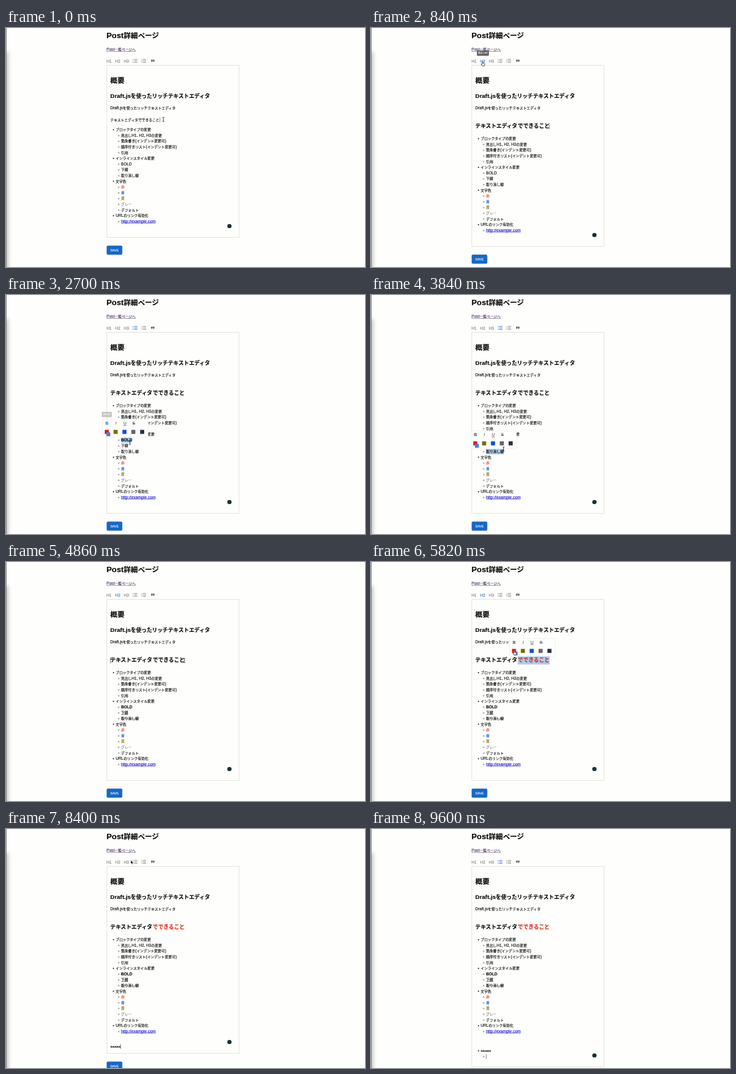
Animation, 600 px wide and 400 px high, one loop 9720 ms. Source, as an HTML page:

```html
<!DOCTYPE html>
<html lang="ja">
<head>
<meta charset="utf-8">
<title>Post詳細ページ</title>
<style>
  html, body { margin: 0; width: 100%; height: 100%; overflow: hidden; background: #fefefc; }
  svg { display: block; width: 600px; height: 400px; }
  text {
    font-family: "Noto Sans CJK JP", "Noto Sans CJK", sans-serif; white-space: pre;
    color: #0c0c0c; fill: currentColor; stroke: currentColor; stroke-width: .14px;
  }
  .latin { font-family: "Liberation Sans", Arial, sans-serif; font-size: 1.12em; }
</style>
</head>
<body>
<svg viewBox="0 0 600 400">
  <defs>
    <filter id="blur" x="-200%" y="-20%" width="500%" height="140%"><feGaussianBlur stdDeviation="3.5"/></filter>
  </defs>
  <rect x="-12" y="40" width="15" height="420" fill="#a0a0a4" opacity=".75" filter="url(#blur)"/>
  <rect width="1" height="400" fill="#808080"/>
  <g id="page"></g>
</svg>
<script>
const LOOP = 9720;
const INK = '#0c0c0c', GREY = '#808080', BLUE = '#2a72e0', PAPER = '#fefefc', VISITED = '#45305c', LINK = '#1208d8';
const BASE = 5.92, LEFT = 174.3, PITCH = 9.6;
const COLORS = { red: '#ee3a24', blue: '#1660d0', yellow: '#94740c', grey: '#808080' };

// Moments at which the document changes
const AT = { heading: 780, bold: 2460, underline: 3360, strike: 4080, headingClick: 4500, red: 5760,
             bottomClick: 6720, newline: 7260, typing: 7440, list: 8640, enter: 9060, indent: 9360 };

// [time, x, y] of the mouse
const MOUSE = [
  [0, 263, 153], [120, 263, 153], [600, 186.5, 57], [960, 186.5, 57],
  [1500, 193, 243], [1620, 193, 243], [1860, 208, 245], [2040, 208, 245],
  [2340, 168, 216], [2490, 168, 216], [2680, 207, 247], [2760, 207, 247], [2880, 193, 252],
  [2940, 193, 252], [3060, 205, 252], [3270, 195.5, 225], [3420, 195.5, 225],
  [3540, 193, 262], [3600, 193, 262], [3780, 222, 262], [4020, 219.5, 235],
  [4140, 219.5, 235], [4440, 176, 165], [4560, 176, 165], [4860, 298, 165],
  [4980, 298, 165], [5280, 246, 165], [5340, 246, 165], [5670, 239.5, 149],
  [5880, 239.5, 149], [6600, 264, 341], [8040, 264, 341], [8400, 208.5, 52],
  [8520, 215.5, 56], [9000, 215.5, 56]
];

const SELECTIONS = [
  { begin: 1620, end: 1860, close: 2850, from: 192.3, to: 210.3, y: 242.6, h: 9.6, done: AT.bold, tool: 0 },
  { begin: 2940, end: 3060, close: 3510, from: 192.3, to: 204.3, y: 252.2, h: 9.6, done: AT.underline, tool: 2 },
  { begin: 3600, end: 3780, close: 4320, from: 192.3, to: 222, y: 261.8, h: 9.6, done: AT.strike, tool: 3 },
  { begin: 4980, end: 5280, close: 6060, from: 298.5, to: 245.3, y: 164.5, h: 14, done: Infinity, tool: -1 }
];

// [start, end, centre x, centre y, width, text]
const TOOLTIPS = [
  [560, 1140, 187, 42, 20, '見出しH2'], [2310, 2770, 168.5, 200, 17, 'BOLD'],
  [3240, 3540, 195.5, 209.7, 27, 'UNDERLINE'], [3990, 4260, 219.5, 219.3, 20, '取り消し線'],
  [8500, 9360, 215.5, 42, 19, '箇条書き']
];

const clamp = (v, a = 0, b = 1) => Math.min(b, Math.max(a, v));
const ease = p => p * p * (3 - 2 * p);
const rect = (x, y, w, h, fill, extra = '') =>
  `<rect x="${x}" y="${y}" width="${w}" height="${h}" fill="${fill}" ${extra}/>`;
const path = (d, extra) => `<path d="${d}" ${extra}/>`;
const line = (x1, x2, y, color, w = .6) => path(`M${x1} ${y}H${x2}`, `stroke="${color}" stroke-width="${w}"`);
const colored = color => `style="color:${color}"`;

// Text placed by its vertical centre; ASCII runs use the Latin face
function text(x, cy, string, size = BASE, extra = '') {
  const runs = string.replace(/[ -~]+/g, run => `<tspan class="latin">${run}</tspan>`);
  return `<text x="${x}" y="${cy + size * .36}" font-size="${size}" ${extra}>${runs}</text>`;
}

function bullet(level, y) {
  return level
    ? `<circle cx="188.4" cy="${y + .4}" r=".95" fill="none" stroke="#444" stroke-width=".5"/>`
    : `<circle cx="179.6" cy="${y + .2}" r="1" fill="${INK}"/>`;
}

function listIcon(x, numbered, color) {
  return [52.6, 55.1, 57.6].map((y, i) =>
    rect(x, y - .5, numbered && i === 1 ? 1.5 : 1.1, 1, color) + rect(x + 2.3, y - .45, 5.4, .9, color)).join('');
}

function toolbar(t) {
  const onList = (t >= 1620 && t < AT.headingClick) || t >= AT.list;
  const onHeading = (t >= AT.heading && t < 1620) || (t >= AT.headingClick && t < AT.bottomClick);
  const quote = x => path(`M${x} 53h2.4v2.2l-1.1 1.9h-1.1l.8-1.7h-1z`, 'fill="#555"');
  return ['H1', 'H2', 'H3'].map((name, i) =>
      text(168 + 14.5 * i, 55.4, name, BASE, colored(i === 1 && onHeading ? BLUE : GREY))).join('')
    + listIcon(211.8, false, onList ? BLUE : GREY) + listIcon(226.4, true, GREY)
    + quote(242.6) + quote(245.7);
}

function listRows(t, top) {
  const rows = [
    [0, 'ブロックタイプの変更'], [1, '見出しH1, H2, H3の変更'], [1, '箇条書き(インデント変更可)'],
    [1, '順序付きリスト(インデント変更可)'], [1, '引用'], [0, 'インラインスタイル変更'],
    [1, 'BOLD', t >= AT.bold ? 'font-weight="700"' : ''], [1, '下線'], [1, '取り消し線'], [0, '文字色'],
    [1, '赤', colored(COLORS.red)], [1, '青', colored(COLORS.blue)],
    [1, '黄', colored(COLORS.yellow)], [1, 'グレー', colored(COLORS.grey)],
    [1, 'デフォルト'], [0, 'URLのリンク有効化']
  ];
  const rowY = i => top + PITCH * i;
  let out = rows.map(([level, string, extra], i) =>
    bullet(level, rowY(i)) + text(level ? 192.3 : 183.3, rowY(i), string, BASE, extra)).join('');
  if (t >= AT.underline) out += line(192.3, 204.2, rowY(7) + 3.2, INK, .5);
  if (t >= AT.strike) out += line(192.3, 222, rowY(8) + .3, INK, .4);
  const linkY = rowY(16);
  return out + bullet(1, linkY) + text(192.3, linkY, 'http://example.com', 6.13, colored(LINK))
    + line(192.3, 250, linkY + 3.1, LINK);
}

function tail(t, typed) {
  if (t < AT.typing) return '';
  const word = 'a'.repeat(typed);
  if (t < AT.list) return text(LEFT, 364, word, 5.5);
  let out = bullet(0, 371) + text(183.3, 371, word, 5.5);
  if (t >= AT.enter) out += bullet(t >= AT.indent ? 1 : 0, 380.5);
  return out;
}

function caret(t, typed) {
  if (SELECTIONS.some(s => t >= s.begin && t < s.close)) return '';
  let x, y, h = 8;
  if (t < AT.heading) [x, y] = [256.8, 153.5];
  else if (t < 1620) [x, y, h] = [297.6, 164.5, 10.5];
  else if (t < AT.headingClick) return '';
  else if (t < 4980) [x, y, h] = [174.3, 164.5, 10.5];
  else if (t < AT.bottomClick) return '';
  else if (t < AT.newline) [x, y] = [174.5, 354];
  else if (t < AT.list) [x, y] = [174.3 + typed * 3.43, 364];
  else if (t < AT.enter) [x, y] = [183.3 + typed * 3.43, 371];
  else [x, y] = [t < AT.indent ? 183.3 : 192.3, 380.5];
  return rect(x, y - h / 2, .6, h, '#333');
}

function highlight(s, t) {
  const edge = s.from + (s.to - s.from) * clamp((t - s.begin) / (s.end - s.begin));
  return rect(Math.min(s.from, edge), s.y - s.h / 2, Math.abs(edge - s.from), s.h, '#a6cdf2');
}

const popupBox = s => ({ x: (s.from + s.to) / 2 - 40, y: s.y - s.h / 2 - 29.7 });

function popup(s, t) {
  const { x, y } = popupBox(s);
  const styles = ['font-weight="700"', 'font-style="italic"', 'text-decoration="underline"', 'text-decoration="line-through"'];
  return rect(x, y, 76, 30, PAPER, 'rx="1.5" stroke="#ececea" stroke-width=".8"')
    + styles.map((style, i) => text(x + 7.3 + 15 * i, y + 7, 'BIUS'[i], 6,
        `${style} text-anchor="middle" ${colored(i === s.tool && t >= s.done ? BLUE : '#555')}`)).join('')
    + ['#e01c10', '#7c6a00', '#0c50d0', '#666', '#26324a'].map((color, i) =>
        rect(x + 3.7 + 14.8 * i, y + 17.6, 6.8, 6.8, color)).join('')
    + rect(x + 6.5, y + 21.8, 6.5, 6.5, '#3f7fe8');
}

function tooltip([start, end, x, y, width, string], t) {
  const opacity = clamp((t - start) / 120) * clamp((end - t) / 200);
  if (!opacity) return '';
  return `<g opacity="${opacity}">${rect(x - width / 2, y - 4.5, width, 9, '#616161', 'rx="1"')}`
    + text(x, y, string, 3.6, `text-anchor="middle" ${colored('#fff')}`) + '</g>';
}

function mouseAt(t) {
  const next = MOUSE.findIndex(point => point[0] > t);
  if (next < 0) return MOUSE[MOUSE.length - 1].slice(1);
  const [t0, x0, y0] = MOUSE[next - 1], [t1, x1, y1] = MOUSE[next];
  const p = ease((t - t0) / (t1 - t0));
  return [x0 + (x1 - x0) * p, y0 + (y1 - y0) * p];
}

function cursor(t, openPopup) {
  if ((t >= 7200 && t < 8040) || t >= 9000) return '';
  const [x, y] = mouseAt(t);
  const box = openPopup && popupBox(openPopup);
  const inPopup = box && x > box.x && x < box.x + 76 && y > box.y && y < box.y + 30;
  const onTool = y > 50 && y < 61 && [172, 186.5, 201, 215.5, 230, 245.5].some(cx => Math.abs(x - cx) < 5);
  let shape;
  if (inPopup || onTool) {
    shape = path('M-.7-.5Q0-1.3 .7-.5V2L3 2.6Q3.8 3 3.6 4L3 6.6H-.5L-2.5 3.7Q-2.5 2.6-.7 3.7Z',
      'fill="#fff" stroke="#222" stroke-width=".8" stroke-linejoin="round"');
  } else if (y > 62) {
    shape = path('M-1.5-3.5Q0-3.5 0-2.8Q0-3.5 1.5-3.5M0-2.8V2.8M-1.5 3.5Q0 3.5 0 2.8Q0 3.5 1.5 3.5',
      'fill="none" stroke="#222" stroke-width=".9"');
  } else {
    shape = path('M0 0V6.6L1.5 5.2L2.5 7.5L3.6 7L2.6 4.8H4.6Z', 'fill="#111" stroke="#fff" stroke-width=".5"');
  }
  return `<g transform="translate(${x} ${y})">${shape}</g>`;
}

function editorBottom(t) {
  if (t < AT.heading) return 350.5;
  if (t < AT.newline) return 365.5;
  if (t < AT.list) return 375.5;
  return t < AT.enter ? 388.5 : 398;
}

function draw(t) {
  const typed = clamp(Math.floor((t - AT.typing) / 100), 0, 5);
  const bottom = editorBottom(t);
  const heading = t >= AT.heading;
  const selection = SELECTIONS.find(s => t >= s.begin && t < s.close);
  const openPopup = selection && t >= selection.end + 60 ? selection : null;
  const bold = 'font-weight="700"';
  const point = 'テキストエディタ', rest = 'でできること';

  return text(168, 12.6, 'Post詳細ページ', BASE * 2, bold)
    + text(168, 36, 'Post一覧ページへ', BASE, colored(VISITED)) + line(168, 217, 39.1, VISITED)
    + toolbar(t)
    + rect(168.5, 62.5, 221, bottom - 62.5, 'none', 'stroke="#e2e2de"')
    + (selection ? highlight(selection, t) : '')
    + text(LEFT, 88.2, '概要', BASE * 2, bold)
    + text(LEFT, 114.1, 'Draft.jsを使ったリッチテキストエディタ', BASE * 1.5, bold)
    + text(LEFT, 134.3, 'Draft.jsを使ったリッチテキストエディタ')
    + (heading
      ? text(LEFT, 164.2, point, BASE * 1.5, bold)
        + text(LEFT + BASE * 12, 164.2, rest, BASE * 1.5, `${bold} ${colored(t >= AT.red ? '#e02810' : INK)}`)
      : text(LEFT, 153.7, point + rest))
    + listRows(t, heading ? 185 : 170)
    + tail(t, typed) + caret(t, typed)
    + `<circle cx="373.4" cy="${bottom - 19}" r="3.6" fill="#16343a"/>`
    + rect(168.3, bottom + 14.4, 26, 15, '#a0a0a0', 'rx="2" opacity=".5"')
    + rect(168.3, bottom + 13.7, 26, 15, '#1668c8', 'rx="2"')
    + text(181.3, bottom + 21.3, 'SAVE', 4.9, `text-anchor="middle" ${colored('#fff')}`)
    + (openPopup ? popup(openPopup, t) : '')
    + TOOLTIPS.map(tip => tooltip(tip, t)).join('')
    + cursor(t, openPopup);
}

const page = document.getElementById('page');
const start = performance.now();
function frame() {
  page.innerHTML = draw((performance.now() - start) % LOOP);
  requestAnimationFrame(frame);
}
frame();
</script>
</body>
</html>
```
